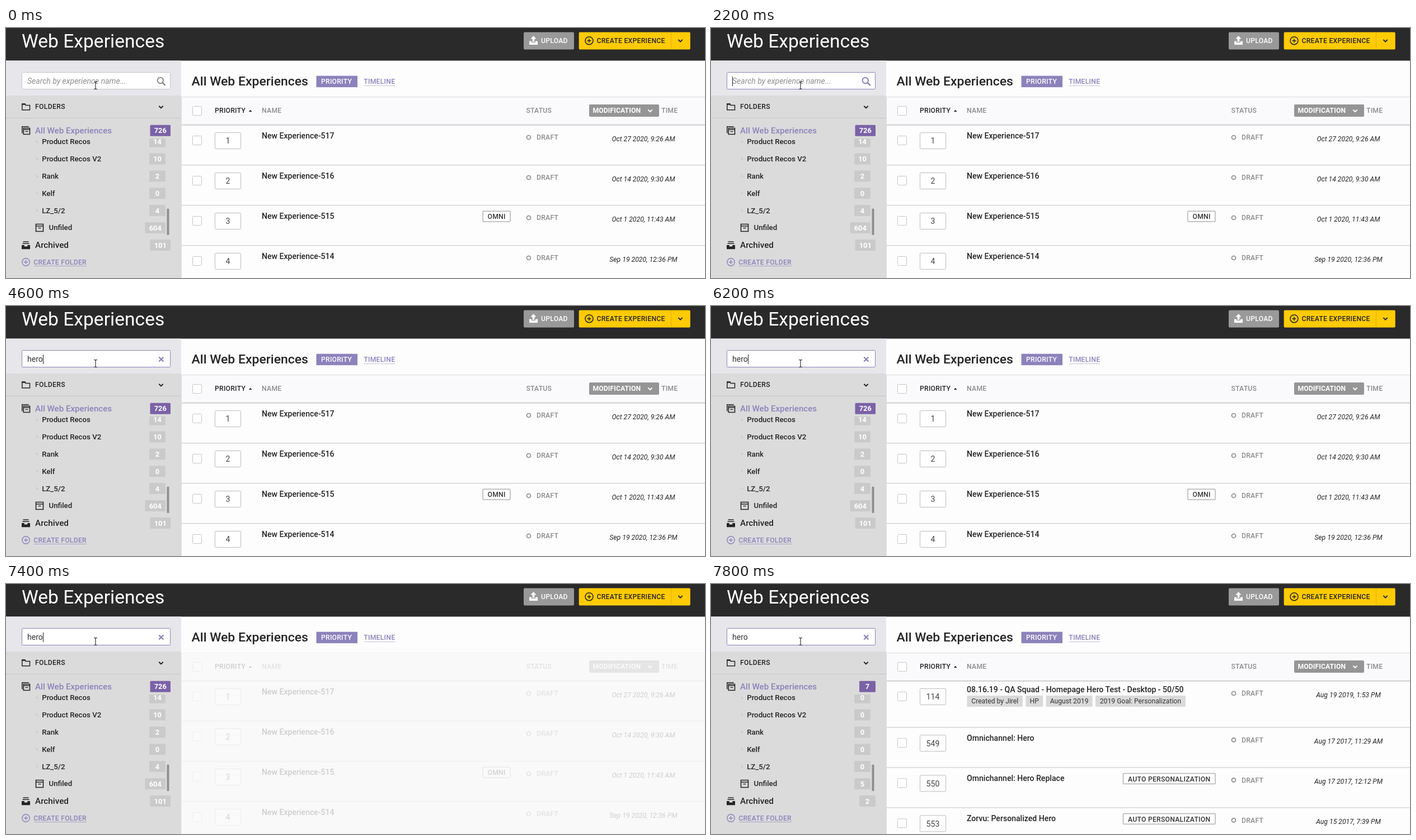
An HTML page for the animation above (8 s loop, 1249 by 448 pixels).

```html
<!DOCTYPE html>
<html lang="en">
<head>
<meta charset="utf-8">
<title>Web Experiences</title>
<style>
  html, body { margin: 0; width: 100%; height: 100%; overflow: hidden; background: #fdfdfd; }
  svg { display: block; width: 100%; height: 100%; }
  text { font-family: Roboto, sans-serif; white-space: pre; }
</style>
</head>
<body>
<svg id="stage" viewBox="0 0 1249 448"></svg>
<script>
const NS = 'http://www.w3.org/2000/svg';
const LOOP = 8000;
const INK = '#242424', PURPLE = '#8d82bb', GREY = '#8b8b8b';
const stage = document.getElementById('stage');

function add(parent, tag, attrs) {
  const el = document.createElementNS(NS, tag);
  for (const key in attrs) el.setAttribute(key, attrs[key]);
  parent.appendChild(el);
  return el;
}
const group = (parent, attrs) => add(parent, 'g', attrs);
const box = (parent, x, y, width, height, fill, more) =>
  add(parent, 'rect', { x, y, width, height, fill, ...more });
const frame = (parent, x, y, w, h, stroke, width = 1) =>
  box(parent, x, y, w, h, '#fff', { stroke, 'stroke-width': width, rx: 1 });
const line = (parent, d, stroke, width = 1) =>
  add(parent, 'path', { d, stroke, 'stroke-width': width, fill: 'none' });
const shape = (parent, d, fill, more) => add(parent, 'path', { d, fill, ...more });

function text(parent, x, y, str, size, fill, weight = 400, more) {
  const el = add(parent, 'text', { x, y, fill, 'font-size': size, 'font-weight': weight, ...more });
  el.textContent = str;
  return el;
}
const caps = (parent, x, y, str, fill, weight = 500, spacing = 0.25) =>
  text(parent, x, y, str, 12.2, fill, weight, { 'letter-spacing': spacing });
const centred = { 'text-anchor': 'middle' };
const chevron = (parent, x, y, color) =>
  line(parent, `M${x - 3.7} ${y - 1.8}l3.7 3.7l3.7 -3.7`, color, 2);

function plusCircle(parent, cx, cy, r, color, width) {
  add(parent, 'circle', { cx, cy, r, fill: 'none', stroke: color, 'stroke-width': width });
  line(parent, `M${cx - 3.5} ${cy}h7M${cx} ${cy - 3.5}v7`, color, width);
}

function badge(parent, right, cy, count, fill = '#cacaca') {
  const label = String(count), w = label.length < 3 ? 29 : 36.5;
  box(parent, right - w, cy - 10, w, 20, fill, { rx: 1.5 });
  text(parent, right - w / 2, cy + 4.6, label, 12.8, '#fff', 700, centred);
}

function header() {
  box(stage, 0, 0, 1249, 58.5, '#2a2a2b');
  text(stage, 28, 34.6, 'Web Experiences', 33.6, '#fff');
  box(stage, 925, 7.6, 90, 30.8, '#999', { rx: 2 });
  shape(stage, 'M942.5 14l5 5.5h-3.2v5.5h-3.6v-5.5h-3.2z', '#fff');
  shape(stage, 'M935 23.5h4v2.5h7v-2.5h4v6.5h-15z', '#fff');
  caps(stage, 956, 27.4, 'UPLOAD', '#fff');
  box(stage, 1023.7, 7.6, 199, 30.8, '#ffcb05', { rx: 2 });
  line(stage, 'M1188.5 8v30', '#dfb20a');
  plusCircle(stage, 1042, 22.7, 7, INK, 1.5);
  caps(stage, 1055.5, 27.4, 'CREATE EXPERIENCE', INK);
  chevron(stage, 1205, 22.7, INK);
}

function sidebar() {
  box(stage, 0, 58.5, 313, 62.5, '#e7e6ea');
  box(stage, 0, 121, 313, 327, '#dbdbdb');
  line(stage, 'M0 161.5h313', '#c6c6c6');

  line(stage, 'M28.8 136h5l1.5 2.5h7.2v8.3h-13.7z', INK, 1.5);
  line(stage, 'M28.5 136.5h6', INK, 2.5);
  caps(stage, 52, 145, 'FOLDERS', INK, 500, 0.35);
  chevron(stage, 277, 141.5, INK);

  line(stage, 'M28.8 188.5v-11.7h12', INK, 1.5);
  line(stage, 'M31.3 179.5h11.2v11h-11.2zM31 182h12', INK, 1.6);
  line(stage, 'M34.5 185.5h5', INK, 1.3);
  text(stage, 52, 188.7, 'All Web Experiences', 15.1, PURPLE, 500);

  ['Product Recos', 'Product Recos V2', 'Rank', 'Kelf', 'LZ_5/2'].forEach((name, i) => {
    const cy = 203.6 + i * 30.8;
    line(stage, `M54.5 ${cy - 3}v4h3.5`, '#c3c3c3');
    text(stage, 64.2, cy + 4.7, name, 13.25, INK, 500);
  });
  line(stage, 'M53.5 351.5h13v13h-13zM53.5 355h13', INK, 1.6);
  line(stage, 'M57.5 358.5h5', INK, 1.4);
  text(stage, 76.5, 362.2, 'Unfiled', 13.25, INK, 500);
  box(stage, 287.5, 323.5, 4, 47.5, '#8f8f8f', { rx: 1.5 });

  line(stage, 'M30.5 383h10M29.5 386.2h12', INK, 1.5);
  shape(stage, 'M28 389h4.8v2.5h5.5v-2.5h4.7v7.3h-15z', INK);
  text(stage, 52, 394, 'Archived', 15.25, INK, 500);

  plusCircle(stage, 35.5, 419.5, 6.7, PURPLE, 1.4);
  caps(stage, 49.3, 424, 'CREATE FOLDER', PURPLE);
  line(stage, 'M50 426.5h94', '#aaa3c8');
}

// Folder counts, from the top entry down to the archive.
function counts(total, folders, unfiled, archived) {
  const g = group(stage);
  badge(g, 294, 183.8, total, '#7b62a7');
  const list = group(g, { 'clip-path': 'url(#list)' });
  folders.forEach((n, i) => badge(list, 285, 203.8 + i * 30.8, n));
  badge(list, 285, 358, unfiled);
  badge(g, 294, 389, archived);
  return g;
}

function mainTop() {
  text(stage, 331.5, 103.4, 'All Web Experiences', 22.95, INK, 500);
  box(stage, 554.5, 85.7, 73.5, 20.4, PURPLE);
  caps(stage, 563, 100.4, 'PRIORITY', '#fff');
  caps(stage, 639.3, 100.4, 'TIMELINE', PURPLE);
  line(stage, 'M640 103.5h55', '#c5c0dc');
}

function tableHead() {
  box(stage, 313, 124, 936, 50, '#faf9fc');
  line(stage, 'M313 123.5h936', '#dcdcdc');
  line(stage, 'M313 173.7h936', '#cfcfcf', 2);
  frame(stage, 333.5, 140.5, 16, 16, '#c6c6c6');
  caps(stage, 373, 152.4, 'PRIORITY', INK);
  shape(stage, 'M433.8 150l2.9 -3.2l2.9 3.2z', INK);
  caps(stage, 457, 152.4, 'NAME', GREY);
  caps(stage, 929.5, 152.4, 'STATUS', GREY);
  box(stage, 1042, 137, 125, 22, '#959595', { rx: 2 });
  caps(stage, 1048.5, 152.4, 'MODIFICATION', '#fff', 700, 0.1);
  chevron(stage, 1151, 148.2, '#fff');
  caps(stage, 1171, 151.9, 'TIME', GREY);
}

function row(parent, top, { id, name, date, label, tags }) {
  frame(parent, 333.5, top + 19.5, 16, 16, '#c6c6c6');
  frame(parent, 373.5, top + 13.5, 46, 29, '#bdbdbd');
  text(parent, 396.5, top + 33.2, id, 14.1, '#444', 400, centred);
  text(parent, 457, top + (tags ? 20 : 24), name, 14.08, INK, 500);
  let x = 457.5;
  for (const [tag, w] of tags || []) {
    box(parent, x, top + 26, w, 20, '#dadada', { rx: 1 });
    text(parent, x + w / 2, top + 40.2, tag, 12.2, '#333', 400, centred);
    x += w + 5.3;
  }
  if (label) {
    const w = label.length > 4 ? 164.5 : 49;
    frame(parent, 901 - w, top + 10.3, w, 18.7, '#b3b3b3', 1.5);
    caps(parent, 901 - w + 8.5, top + 24.2, label, '#333');
  }
  add(parent, 'circle', { cx: 934, cy: top + 22, r: 3.5, fill: 'none', stroke: GREY, 'stroke-width': 1.7 });
  caps(parent, 948, top + 26.2, 'DRAFT', GREY);
  text(parent, 1139, top + 29, date, 12.2, INK, 400, { ...centred, 'font-style': 'italic' });
}

function table(rows) {
  const g = group(stage);
  let top = 174;
  for (const data of rows) {
    row(g, top, data);
    top += data.tags ? 83.3 : 72;
    line(g, `M313 ${top - 0.4}h936`, '#cfcfcf', 1.2);
  }
  return g;
}

const clip = add(add(stage, 'defs'), 'clipPath', { id: 'list' });
box(clip, 0, 198, 313, 180, '#000');

box(stage, 0, 0, 1249, 448, '#fdfdfd');
header();
sidebar();
mainTop();
tableHead();

const before = [
  counts(726, [14, 10, 2, 0, 4], 604, 101),
  table([
    { id: 1, name: 'New Experience-517', date: 'Oct 27 2020, 9:26 AM' },
    { id: 2, name: 'New Experience-516', date: 'Oct 14 2020, 9:30 AM' },
    { id: 3, name: 'New Experience-515', date: 'Oct 1 2020, 11:43 AM', label: 'OMNI' },
    { id: 4, name: 'New Experience-514', date: 'Sep 19 2020, 12:36 PM' }
  ])
];
const after = [
  counts(7, [0, 0, 0, 0, 0], 5, 2),
  table([
    { id: 114, name: '08.16.19 - QA Squad - Homepage Hero Test - Desktop - 50/50', date: 'Aug 19 2019, 1:53 PM',
      tags: [['Created by Jirel', 99.5], ['HP', 31], ['August 2019', 83], ['2019 Goal: Personalization', 161]] },
    { id: 549, name: 'Omnichannel: Hero', date: 'Aug 17 2017, 11:29 AM' },
    { id: 550, name: 'Omnichannel: Hero Replace', date: 'Aug 17 2017, 12:12 PM', label: 'AUTO PERSONALIZATION' },
    { id: 553, name: 'Zorvu: Personalized Hero', date: 'Aug 15 2017, 7:39 PM', label: 'AUTO PERSONALIZATION' }
  ])
];
line(stage, 'M313.5 124v324', '#dedede');
const veil = box(stage, 313, 123, 936, 325, '#faf9fb', { opacity: 0.8 });

// Search field
const field = frame(stage, 28.5, 79.5, 265, 30, '#c4c4c4');
const hint = text(stage, 38, 100, 'Search by experience name...', 14, '#8e8e8e', 400, { 'font-style': 'italic' });
const typed = text(stage, 38, 100, '', 14.1, '#333');
const lens = group(stage, { fill: 'none', 'stroke-width': 2 });
add(lens, 'circle', { cx: 275.8, cy: 94, r: 5.2 });
add(lens, 'path', { d: 'M279.6 97.8l5 5', 'stroke-width': 2.6 });
const cross = line(stage, 'M273.3 91.5l8 8m0 -8l-8 8', PURPLE, 2.4);
const caret = box(stage, 38, 87, 1, 17, '#222');

// Mouse pointers
const beam = line(stage, 'M157 96.5h2l1 1l1 -1h2M160 97v12M157 109.5h2l1 -1l1 1h2', '#222', 1.1);
const arrow = shape(stage, 'M160.5 102.5v13.5l3 -2.8l2.2 5.3l2 -.9l-2.2 -5h3.5z', '#fff',
  { stroke: '#222', 'stroke-width': 1 });

const show = (el, on) => el.setAttribute('visibility', on ? 'visible' : 'hidden');
const at = (t, steps) => steps.reduce((value, [time, next]) => (t >= time ? next : value), null);

const TYPING = [[0, ''], [2600, 'h'], [3200, 'her'], [3400, 'hero']];
const CARET_X = { '': 38, h: 45, her: 58, hero: 66 };
const BLINKS = [400, 600, 1400, 1600, 2200, 4000, 4600, 5200, 5600, 7800];

function update(t) {
  const word = at(t, TYPING), focused = t >= 400, done = t >= 7600;
  typed.textContent = word;
  show(hint, !word);
  show(lens, !word);
  show(cross, word);
  lens.setAttribute('stroke', focused ? PURPLE : GREY);
  field.setAttribute('stroke', focused ? PURPLE : '#c4c4c4');
  caret.setAttribute('x', CARET_X[word]);
  show(caret, BLINKS.filter(b => t >= b).length % 2);

  const pointing = t >= 6000 && t < 6200;
  show(arrow, pointing);
  show(beam, !pointing);

  before.forEach(el => show(el, !done));
  after.forEach(el => show(el, done));
  show(veil, t >= 6800 && t < 7800);
}

const start = performance.now();
function tick() {
  update((performance.now() - start) % LOOP);
  requestAnimationFrame(tick);
}
tick();
</script>
</body>
</html>
```
